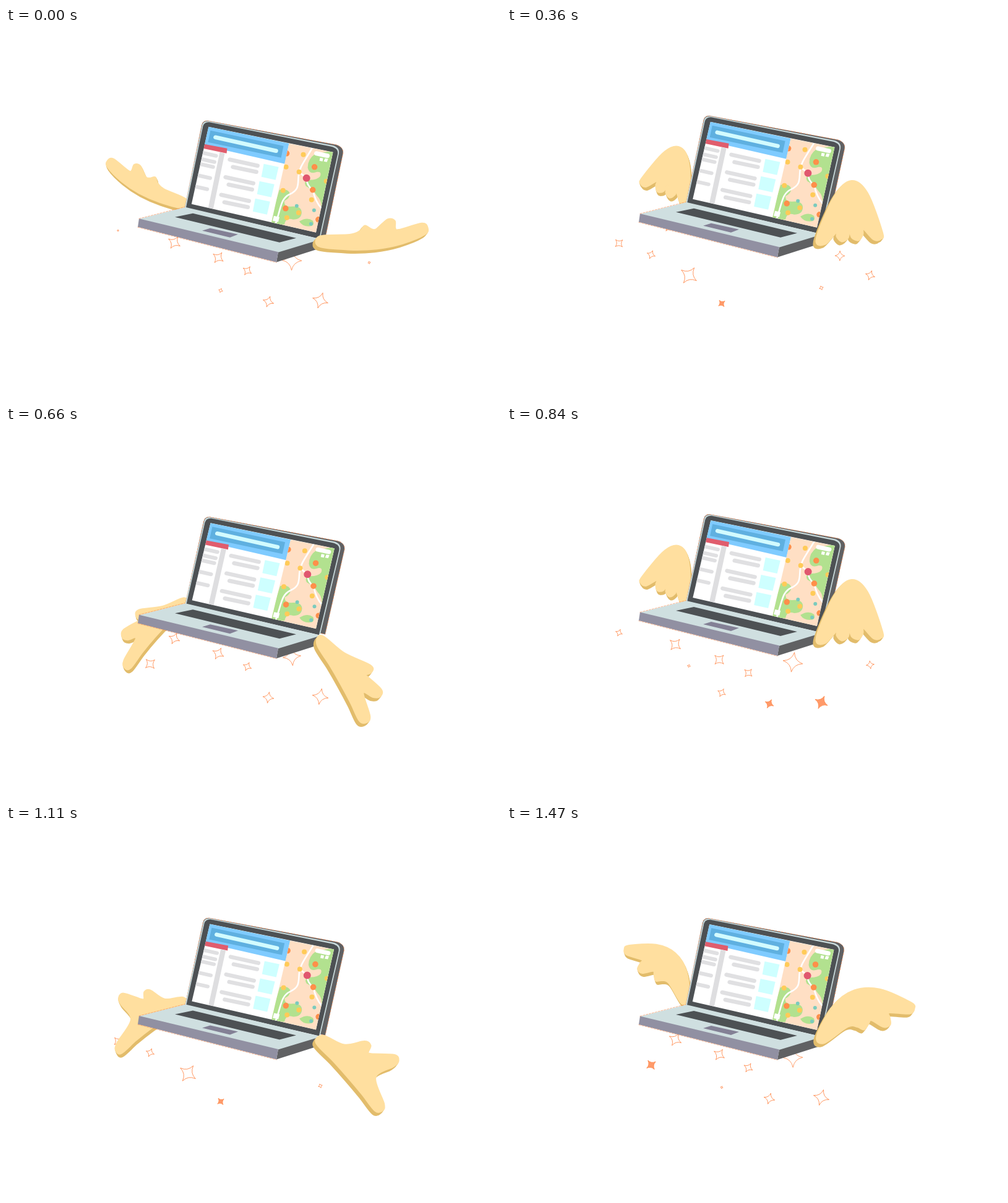
An HTML page with a canvas for the animation above (1500 ms loop, 800 px wide and 600 px high).

```html
<!DOCTYPE html>
<html lang="en">
<head>
<meta charset="utf-8">
<title>Flying laptop</title>
<style>
html, body { margin: 0; width: 100%; height: 100%; overflow: hidden; background: #fff; }
canvas { display: block; width: 800px; height: 600px; }
</style>
</head>
<body>
<canvas id="stage" width="800" height="600"></canvas>
<script>
const ctx = document.getElementById('stage').getContext('2d');
const LOOP = 1500, FLAP = 500, TWINKLE = 750, DROP = 27;
const ROOT = [507, 345];
const ORANGE = '#ff8a4c', DARK = '#4d5154', GREY = '#e0e0e2', PEACH = '#ffdfc4', GREEN = '#b2e18f';

const mix = (a, b, u) => [a[0] + (b[0] - a[0]) * u, a[1] + (b[1] - a[1]) * u];
const move = (p, d, k) => [p[0] + d[0] * k, p[1] + d[1] * k];
const quad = (a, b, c, u) => mix(mix(a, b, u), mix(b, c, u), u);
const ease = u => u * u * (3 - 2 * u);

function unit(a, b) {
  const dx = b[0] - a[0], dy = b[1] - a[1], l = Math.hypot(dx, dy);
  return [dx / l, dy / l];
}

// Wing outline from the bend of its leading edge, its palm and three feather tips
function outline(bend, palm, ...tips) {
  const along = unit(ROOT, palm), lead = unit(ROOT, bend);
  const side = Math.sign(along[0] * lead[1] - along[1] * lead[0]);
  const across = ([x, y]) => [-y * side, x * side];
  const first = move(ROOT, across(along), 8), last = move(ROOT, across(along), -8);
  const feathers = tips.map(tip => {
    const d = unit(palm, tip), neck = move(tip, d, -7);
    return [move(neck, across(d), 9), tip, move(neck, across(d), -9)];
  });
  const pts = [first];
  for (const u of [.25, .5, .75]) pts.push(quad(first, bend, feathers[0][0], u));
  feathers.forEach((f, i) => {
    const notch = mix(mix(tips[i], tips[i + 1] || last, .5), palm, .28);
    pts.push(...f, notch);
  });
  return [...pts, last];
}

const flat = outline([608, 370], [585, 350], [681, 323], [628, 312], [580, 320]);
const low = outline([557, 408], [535, 372], [608, 460], [634, 380], [589, 355]);
const drop = outline([545, 420], [535, 360], [580, 479], [602, 440], [590, 400]);
const fold = outline([615, 213], [565, 305], [575, 384], [549, 373], [525, 351]);
const high = outline([560, 160], [550, 280], [604, 341], [568, 343], [541, 345]);
const open = outline([545, 220], [565, 285], [658, 295], [619, 321], [577, 329]);
const POSES = [[0, flat], [40, flat], [110, low], [170, drop], [290, fold], [340, high], [360, high], [470, open], [500, flat]];

// x, top y, radius, birth
const SPARKS = [
  [181, 327, 8, 740], [233, 361, 10, 260], [261, 308, 7, 110], [272, 335, 11, 530],
  [294, 386, 15, 82], [343, 357, 10, 490], [347, 421, 7, 690], [390, 380, 8, 530],
  [424, 421, 9, 365], [462, 364, 16, 510], [508, 419, 13, 335], [538, 357, 8, 160], [587, 378, 8, 725]
];

function poly(fill, ...p) {
  ctx.beginPath();
  for (let i = 0; i < p.length; i += 2) ctx.lineTo(p[i], p[i + 1]);
  ctx.closePath();
  ctx.fillStyle = fill;
  ctx.fill();
}

function line(color, width, x1, y1, x2, y2) {
  ctx.beginPath();
  ctx.moveTo(x1, y1);
  ctx.lineTo(x2, y2);
  ctx.strokeStyle = color;
  ctx.lineWidth = width;
  ctx.lineCap = 'round';
  ctx.stroke();
}

function dots(color, r, ...p) {
  ctx.fillStyle = color;
  for (let i = 0; i < p.length; i += 2) {
    ctx.beginPath();
    ctx.arc(p[i], p[i + 1], r, 0, 7);
    ctx.fill();
  }
}

function shape(fill, d) {
  ctx.fillStyle = fill;
  ctx.fill(new Path2D(d));
}

function road(d) {
  ctx.strokeStyle = '#fff';
  ctx.lineWidth = 2.6;
  ctx.stroke(new Path2D(d));
}

function wingAt(t) {
  const i = POSES.findIndex(p => p[0] > t);
  const [t0, a] = POSES[i - 1], [t1, b] = POSES[i];
  const u = ease((t - t0) / (t1 - t0));
  return a.map((p, k) => mix(p, b[k], u));
}

// Smooth closed curve through all points
function curve(p, color) {
  const n = p.length, at = i => p[(i + n) % n];
  ctx.beginPath();
  ctx.moveTo(...p[0]);
  for (let i = 0; i < n; i++) {
    const [a, b, c, d] = [at(i - 1), at(i), at(i + 1), at(i + 2)];
    ctx.bezierCurveTo(b[0] + (c[0] - a[0]) / 6, b[1] + (c[1] - a[1]) / 6,
      c[0] - (d[0] - b[0]) / 6, c[1] - (d[1] - b[1]) / 6, ...c);
  }
  ctx.fillStyle = ctx.strokeStyle = color;
  ctx.lineWidth = 3;
  ctx.lineJoin = 'round';
  ctx.fill();
  ctx.stroke();
}

function wing(pts, shade) {
  for (const k of [1, .66, .33]) curve(pts.map(p => move(p, shade, k)), '#e2bc6b');
  curve(pts, '#ffdf9f');
}

// The far wing is a mirrored, foreshortened copy
function toLeft([x, y]) {
  const dx = x - 505, dy = y - 348;
  return [289 - .75 * dx - .3 * dy, 287 - .29 * dx + .86 * dy + .0008 * dy * dy];
}

function spark(x, y, r, turn, fill) {
  ctx.save();
  ctx.translate(x, y);
  ctx.rotate(turn * Math.PI / 180);
  ctx.beginPath();
  ctx.moveTo(0, -r);
  for (let i = 1; i <= 4; i++) {
    const a = i * Math.PI / 2, m = a - Math.PI / 4;
    ctx.quadraticCurveTo(Math.sin(m) * r * .22, -Math.cos(m) * r * .22, Math.sin(a) * r, -Math.cos(a) * r);
  }
  ctx.fillStyle = fill;
  ctx.fill();
  ctx.strokeStyle = ORANGE;
  ctx.lineWidth = .8;
  ctx.lineJoin = 'round';
  ctx.stroke();
  ctx.restore();
}

// Each star grows, sinks, blushes and goes out; big ones last longer
function sparks(t) {
  for (const [x, y, r, birth] of SPARKS) {
    const u = (t - birth + TWINKLE) % TWINKLE / (400 + 9 * r);
    if (u >= 1) continue;
    const size = Math.min(1, .12 + u / .35, 1.64 - .8 * u);
    const fill = u < .82 ? '#fff' : u < .88 ? '#ffcdbd' : '#ff9a6a';
    spark(x, y + DROP * u, r * size, (x < 400 ? 30 : 0) + 45 * (u - .4), fill);
  }
}

function map() {
  ctx.save();
  ctx.beginPath();
  ctx.moveTo(458, 187);
  ctx.lineTo(529, 201);
  ctx.lineTo(501, 331);
  ctx.lineTo(429, 315);
  ctx.clip();
  poly(PEACH, 450, 180, 535, 195, 510, 340, 420, 320);
  shape(GREEN, 'M532 198 L500 204 Q488 212 488 226 Q490 238 503 233 Q511 232 508 240 Q504 246 490 246 Q480 248 485 256 Q497 262 503 272 Q512 280 509 296 L520 260Z');
  shape(GREEN, 'M442 262 Q456 259 459 268 Q459 276 450 280 Q449 289 460 289 Q478 287 478 299 Q477 310 464 310 Q452 306 450 318 L425 318Z');
  shape(GREEN, 'M474 313 Q487 305 496 312 Q500 321 489 321 Q479 321 474 313Z');
  road('M495 195 C482 217 474 226 473 240 S474 262 459 269 S445 290 436 316');
  road('M474 233 L486 243 Q486 255 496 262 Q500 281 510 292');
  dots('#ff8f4a', 4.8, 454, 203, 499, 225, 496, 262, 452, 292, 505, 310);
  dots('#ffcb58', 4, 481, 205, 453, 225, 474, 233, 448, 263, 494, 278, 473, 299, 454, 307, 518, 248);
  dots('#7bcbbd', 3, 470, 288, 498, 295, 493, 317);
  dots('#e0576f', 6, 486, 243);
  line('#fff', 7, 502, 203, 520, 207);
  poly('#fff', 508, 210, 513, 211, 512, 216, 507, 215);
  poly('#fff', 516, 211, 521, 212, 519, 217, 514, 216);
  poly('#fff', 433, 304, 442, 306, 440, 314, 431, 312);
  ctx.restore();
}

function screen() {
  ctx.save();
  ctx.beginPath();
  ctx.moveTo(328, 160);
  ctx.lineTo(529, 201);
  ctx.lineTo(501, 331);
  ctx.lineTo(300, 285);
  ctx.clip();
  poly('#fff', 290, 150, 540, 190, 510, 340, 290, 300);
  poly('#7fcbff', 328, 160, 458, 187, 451, 220, 320, 190);
  poly('#5fb0e0', 331, 166, 449, 191, 445, 210, 327, 185);
  line('#d2fbff', 6.5, 339, 177, 437, 199);
  poly('#e05d6d', 321, 188, 358, 195, 357, 203, 319, 195);
  for (const y of [203, 213, 221, 239, 257]) {
    const x = 318 - (y - 203) * .27;
    line(GREY, 6, x, y - 1, x + 22, y + 4);
  }
  poly('#dedee0', 346, 201, 354, 203, 335, 293, 327, 291);
  for (let i = 0; i < 3; i++) {
    const x = 362 - 7 * i, y = 213 + 28.5 * i;
    line(GREY, 6.5, x, y, x + 45, y + 10);
    line(GREY, 6.5, x + 5, y + 12, x + 43, y + 20);
    const a = 417 - 7 * i, b = 220 + 28 * i;
    poly('#ceffff', a, b, a + 24, b + 5, a + 19, b + 26, a - 4, b + 21);
  }
  map();
  ctx.restore();
}

function lid(sway) {
  ctx.save();
  ctx.transform(1, 0, -sway / 180, 1, sway * 330 / 180, 0);
  const back = new Path2D('M289 292 L317 157 Q319 149 328 150.5 L534 189 Q547 193 545 204 L516 340Z');
  ctx.fillStyle = '#606163';
  ctx.fill(back);
  ctx.strokeStyle = ORANGE;
  ctx.lineWidth = .7;
  ctx.setLineDash([3, 2]);
  ctx.stroke(back);
  ctx.setLineDash([]);
  shape('#c9dadb', 'M289 291 L317.5 158 Q319 150 328 151 L528 190 Q540 193 538.5 203 L508 340Z');
  shape(DARK, 'M291 291 L319 159 Q321 152 329 152.5 L526 192 Q538 195 536.5 204 L506 341Z');
  screen();
  ctx.restore();
}

function base() {
  poly('#606163', 440, 362, 506, 342, 506, 357, 437, 379);
  poly('#cfdfe0', 290, 290, 505, 341, 506, 343, 440, 363, 215, 309);
  poly('#9190a2', 215, 308.5, 440, 362.5, 437, 379, 213, 322);
  poly(DARK, 302, 300, 469, 340, 442, 347, 273, 306);
  poly('#838095', 330, 324, 375, 334, 362, 339, 317, 328);
  ctx.setLineDash([3, 2]);
  line(ORANGE, .6, 213, 322.5, 437, 379.5);
  line(ORANGE, .6, 215, 308.5, 289, 289.5);
  ctx.setLineDash([]);
}

function draw(t) {
  const phase = t % FLAP;
  const wave = peak => Math.cos((phase - peak) / FLAP * 2 * Math.PI);
  const c = wave(35);
  const bob = 4.8 * (c * (1.3 - .3 * c * c) - 1);
  const pts = wingAt(phase);
  ctx.fillStyle = '#fff';
  ctx.fillRect(0, 0, 800, 600);
  sparks(t);
  wing(pts.map(toLeft), [2, 5]);
  ctx.save();
  ctx.translate(0, bob);
  lid(1.2 - 2 * wave(470));
  base();
  ctx.restore();
  wing(pts, [-4, 5]);
}

const start = performance.now();
function tick() {
  const t = (performance.now() - start) % LOOP;
  const step = t < 600 ? 60 : 30;
  draw(Math.floor(t / step) * step);
  requestAnimationFrame(tick);
}
tick();
</script>
</body>
</html>
```
